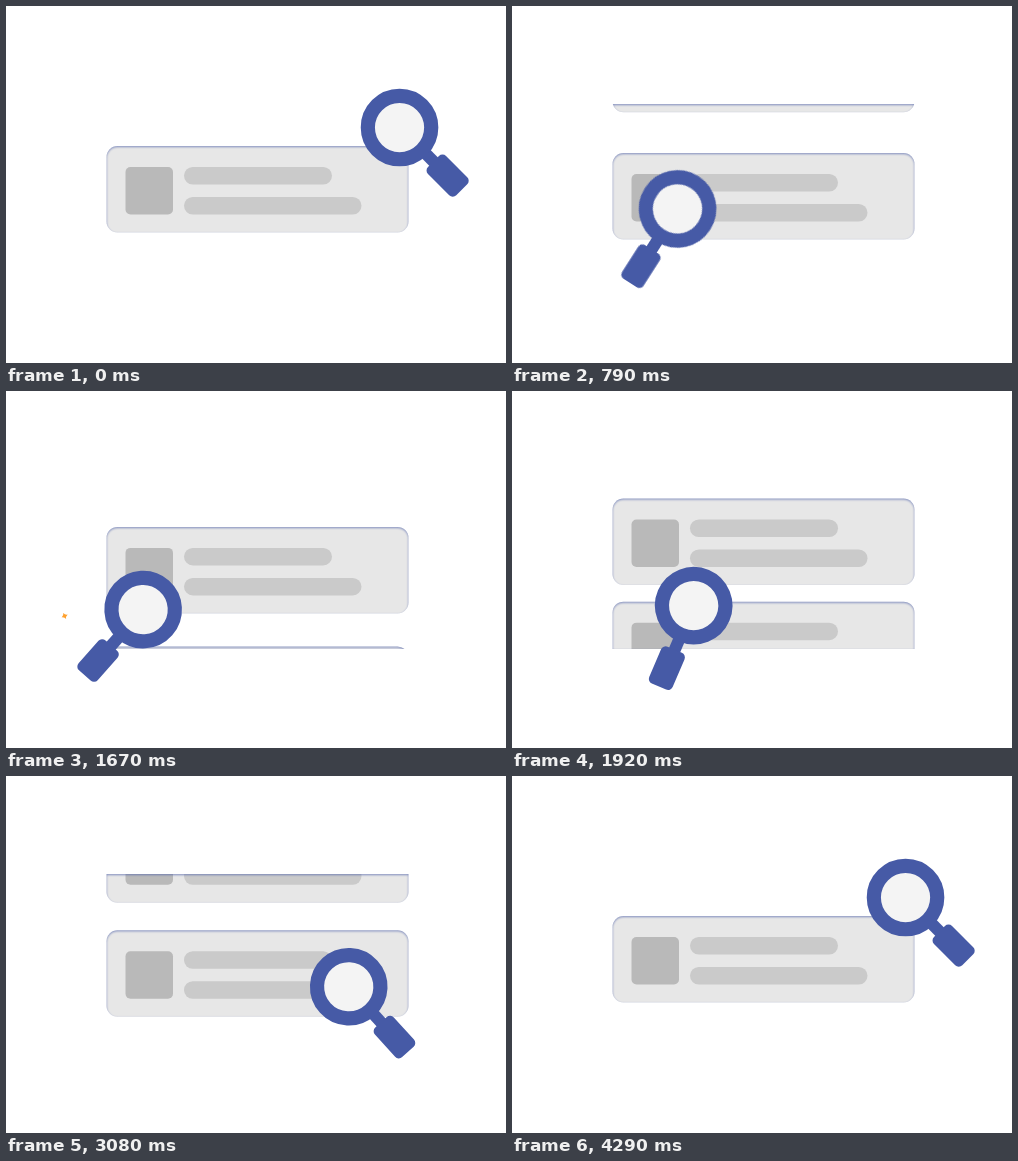
An HTML page for the animation above (4330 ms loop, 500 by 357 pixels).

```html
<!DOCTYPE html>
<html lang="en">
<head>
<meta charset="utf-8">
<title>Search</title>
<style>
  html, body { margin: 0; width: 100%; height: 100%; overflow: hidden; background: #fff; }
  svg { display: block; width: 100%; height: 100%; }
</style>
</head>
<body>
<svg viewBox="0 0 500 357">
  <defs>
    <clipPath id="view"><rect x="90" y="98" width="330" height="160"/></clipPath>
    <filter id="rim" filterUnits="userSpaceOnUse" x="80" y="80" width="350" height="200" color-interpolation-filters="sRGB">
      <feFlood flood-color="#465aa6"/>
      <feComposite operator="out" in2="SourceAlpha"/>
      <feGaussianBlur stdDeviation="1.1"/>
      <feOffset dx=".4" dy="1.3"/>
      <feComposite operator="in" in2="SourceAlpha" result="glow"/>
      <feComponentTransfer in="glow" result="soft"><feFuncA type="linear" slope=".65"/></feComponentTransfer>
      <feMerge><feMergeNode in="SourceGraphic"/><feMergeNode in="soft"/></feMerge>
    </filter>
    <g id="card">
      <rect x="100.5" width="302" height="86.5" rx="11" fill="#e7e7e7"/>
      <rect x="119.5" y="21" width="47.5" height="47.5" rx="5" fill="#b9b9b9"/>
      <g fill="#cacaca">
        <rect x="178" y="21" width="148" height="17.5" rx="8.75"/>
        <rect x="178" y="51" width="177.5" height="17.5" rx="8.75"/>
      </g>
    </g>
  </defs>
  <g filter="url(#rim)">
    <g clip-path="url(#view)">
      <use id="leaving" href="#card"/>
      <use id="entering" href="#card"/>
    </g>
  </g>
  <path id="star" fill="#ffa12f" d="M0-10Q1.8-2.6 10 0Q1.8 2.6 0 10Q-1.8 2.6-10 0Q-1.8-2.6 0-10Z"/>
  <!-- The glass lies along +x and turns about a point 23 px from the lens centre. -->
  <g id="glass" fill="#465aa6">
    <g transform="translate(-23)">
      <rect x="34" y="-6" width="20" height="12"/>
      <rect x="48" y="-12.75" width="40" height="25.5" rx="5"/>
      <circle r="31.7" fill="#f4f4f4" stroke="#465aa6" stroke-width="14.2"/>
    </g>
  </g>
</svg>
<script>
const LOOP = 4330, FRAMES = 104;
const $ = id => document.getElementById(id);
const clamp = x => Math.min(1, Math.max(0, x));
const mix = (a, b, p) => a + (b - a) * p;

// cubic-bezier(.8, 0, .2, 1)
function ease(x) {
  x = clamp(x);
  let lo = 0, hi = 1;
  for (let i = 0; i < 30; i++) {
    const t = (lo + hi) / 2, s = 1 - t;
    if (2.4 * t * s * s + .6 * t * t * s + t ** 3 < x) lo = t; else hi = t;
  }
  return lo * lo * (3 - 2 * lo);
}

// Times are in steps of 1/24 s.
const stops = [
  { x: 409.8, y: 137.8, turn: 45 },
  { x: 112.2, y: 235.8, turn: 135 },
  { x: 353.6, y: 235.8, turn: 48 },
  { x: 409.8, y: 137.8, turn: 45 }
];
const sweeps = [[0, 30], [33, 63], [62.9, 99]];
const scrolls = [
  { start: 0, end: 26, lag: .75, from: 140, to: 140 },
  { start: 33, end: 60, lag: 1.3, from: 140, to: 137 },
  { start: 60, end: 82.5, lag: 1.3, from: 137, to: 135 }
];
const stars = [
  { x: 58.7, y: 225, start: 24.5, end: 41 },
  { x: 421, y: 195, start: 50.5, end: 67 },
  { x: 323, y: 115, start: 84, end: 99 }
];

function drawCards(f) {
  const s = scrolls.findLast(m => f >= m.start);
  const progress = lag => ease((f - s.start - lag) / (s.end - s.start));
  const settle = 5 * ease((f - 84) / 7) * (s === scrolls[2]);
  const place = (id, y) => $(id).setAttribute("transform", `translate(0 ${y})`);
  place("leaving", s.from - 130 * progress(s.lag));
  place("entering", mix(262, s.to, progress(0)) + settle);
}

function drawGlass(f) {
  const i = sweeps.findLastIndex(([start]) => f >= start);
  const [start, end] = sweeps[i];
  const p = ease((f - start) / (end - start));
  const at = key => mix(stops[i][key], stops[i + 1][key], p);
  $("glass").setAttribute("transform", `translate(${at("x")} ${at("y")}) rotate(${at("turn")})`);
}

function drawStar(f) {
  const s = stars.find(m => f > m.start && f < m.end);
  $("star").style.display = s ? "" : "none";
  if (!s) return;
  const size = clamp(Math.min(f - s.start, s.end - f) / 3);
  $("star").setAttribute("transform",
    `translate(${s.x} ${s.y}) rotate(${(f - s.start) * 10}) scale(${size})`);
}

const begin = performance.now();
function tick() {
  const t = (performance.now() - begin) % LOOP;
  const f = Math.floor(t / LOOP * FRAMES + .1) % FRAMES;
  drawCards(f);
  drawGlass(f);
  drawStar(f);
  requestAnimationFrame(tick);
}
tick();
</script>
</body>
</html>
```
